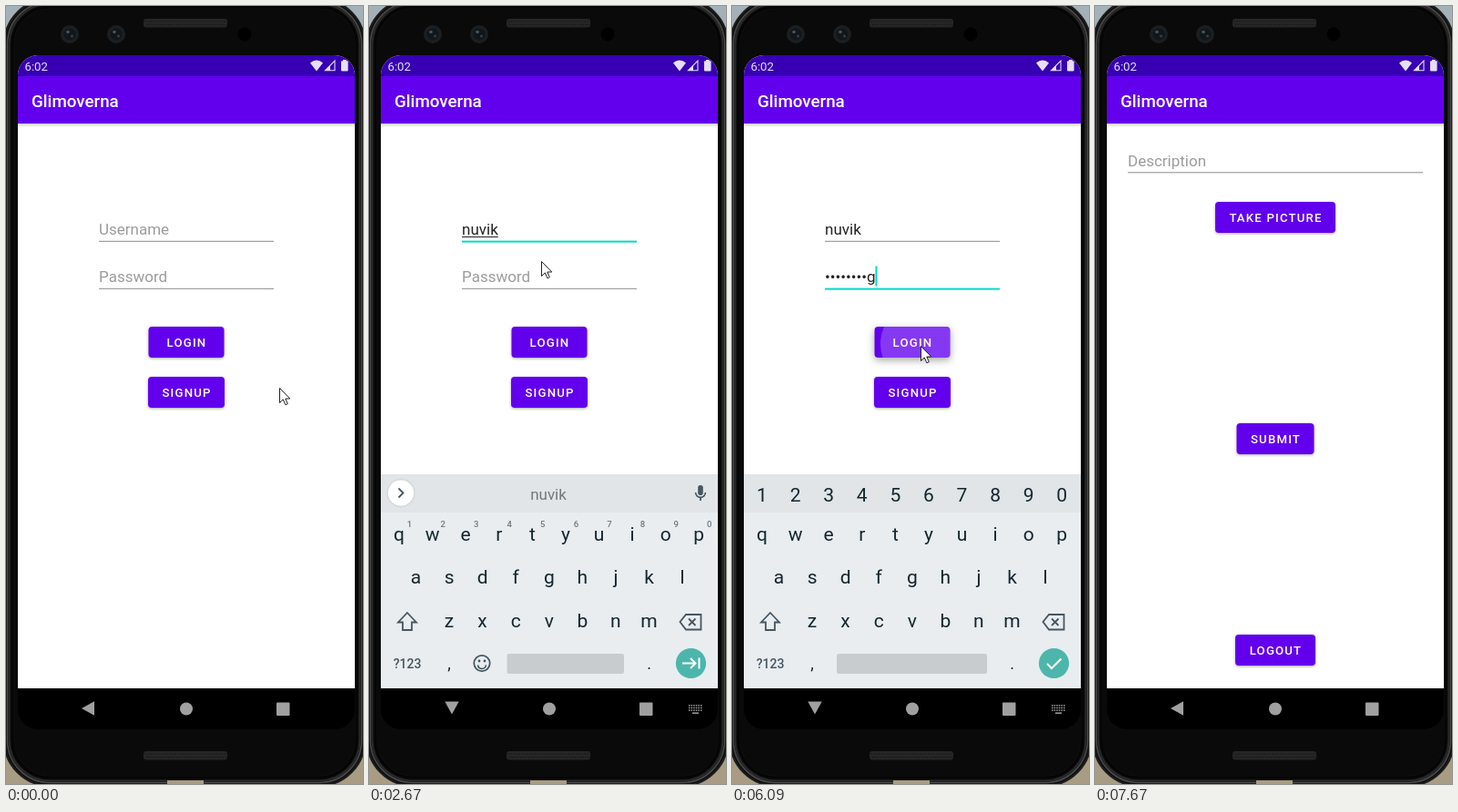
These frames come from a looping animation (392x854 px, 8000 ms). An HTML page with a canvas:

```html
<!DOCTYPE html>
<html lang="en">
<head>
<meta charset="utf-8">
<title>Login demo</title>
<style>
html, body { margin: 0; width: 100%; height: 100%; overflow: hidden; background: #0a0a0a; }
canvas { display: block; width: 392px; height: 854px; }
</style>
</head>
<body>
<canvas id="stage"></canvas>
<script>
const W = 392, H = 854, LOOP = 8000;
const APP = 'Glimoverna', USER = 'nuvik', SECRET = 'kdtmwopag';
const PURPLE = '#6200ee', TEAL = '#03dac5', KEY = '#14262f', ICON = '#465660';
const dpr = window.devicePixelRatio || 1;

const stage = document.getElementById('stage');
const layer = document.createElement('canvas');
for (const c of [stage, layer]) { c.width = W * dpr; c.height = H * dpr; }
const main = stage.getContext('2d'), side = layer.getContext('2d');
main.scale(dpr, dpr);
side.scale(dpr, dpr);
let g = main;

// Held tracks: [start time, value]
const track = {
  pointer: [[0, [300, 419]], [150, [270, 358]], [285, [234, 285]], [420, [219, 254]],
    [2670, [189, 280]], [2800, [181, 293]], [2960, [177, 298]], [3130, [177, 294]],
    [5320, [181, 306]], [5470, [192, 336]], [5620, [204, 363]], [5770, [207, 373]],
    [6490, [300, 310]], [6650, [354, 274]], [6790, null]],
  focus: [[0, ''], [720, 'user'], [3300, 'pass']],
  caret: [[0, 0], [720, 1], [1250, 0], [1690, 1], [2670, 0], [2960, 1], [3750, 0], [4030, 1],
    [5320, 0], [5770, 1]],
  typed: [[0, 0], [1690, 2], [1970, 4], [2090, 5]],
  secret: [[0, 0], [4030, 2], [4170, 3], [4320, 5], [4460, 6], [4610, 8], [4760, 9]],
  keyboard: [[0, null], [990, [80, .15]], [1110, [45, .4]], [1250, [20, .7]], [1390, [7, .9]],
    [1540, [0, 1]], [7370, [14, .4]], [7520, null]],
  ripple: [[0, null], [6090, [45, .22]], [6210, [70, .24]], [6350, [90, .14]], [6490, [90, .06]], [6650, null]],
  open: [[0, null], [7250, [.26, .2]], [7370, [.85, 1]], [7520, [.98, 1]], [7670, [1, 1]]],
  turn: [[0, 0], [990, .3], [1110, .75], [1250, 1], [7250, .72], [7370, .2], [7520, 0]]
};
const at = (name, t) => track[name].filter(k => k[0] <= t).pop()[1];

function rect(x, y, w, h, fill) { g.fillStyle = fill; g.fillRect(x, y, w, h); }

function round(x, y, w, h, r, fill) {
  g.beginPath();
  g.roundRect(x, y, w, h, r);
  if (fill) { g.fillStyle = fill; g.fill(); }
}

function disc(x, y, r, fill) {
  g.beginPath();
  g.arc(x, y, r, 0, 7);
  g.fillStyle = fill;
  g.fill();
}

function poly(points, fill) {
  g.beginPath();
  for (let i = 0; i < points.length; i += 2) g.lineTo(points[i], points[i + 1]);
  g.closePath();
  if (fill) { g.fillStyle = fill; g.fill(); }
}

function line(points, color, width = 1.8) {
  g.beginPath();
  for (let i = 0; i < points.length; i += 2) g.lineTo(points[i], points[i + 1]);
  stroke(color, width);
}

function stroke(color, width) { g.strokeStyle = color; g.lineWidth = width; g.stroke(); }

function text(s, x, y, size, color, { weight = 400, align = 'left', gap = 0 } = {}) {
  g.font = `${weight} ${size}px Roboto, sans-serif`;
  g.textAlign = align;
  g.letterSpacing = gap + 'px';
  g.fillStyle = color;
  g.fillText(s, x, y);
  const w = g.measureText(s).width;
  g.letterSpacing = '0px';
  return w;
}
const centred = (s, x, y, size, color, weight = 400) => text(s, x, y, size, color, { weight, align: 'center' });

// Paints through a second canvas so overlapping shapes fade as one
function group(alpha, draw) {
  if (alpha >= 1) return draw();
  side.clearRect(0, 0, W, H);
  side.save();
  g = side;
  draw();
  g = main;
  side.restore();
  g.save();
  g.setTransform(dpr, 0, 0, dpr, 0, 0);
  g.globalAlpha = alpha;
  g.drawImage(layer, 0, 0, W, H);
  g.restore();
}

function zoom(s) {
  g.translate(198, 424);
  g.scale(s, s);
  g.translate(-198, -424);
}

function phone() {
  const bg = g.createLinearGradient(0, 0, 0, H);
  bg.addColorStop(0, '#a3b1b8');
  bg.addColorStop(1, '#a89c83');
  rect(0, 0, W, H, bg);
  round(-2, -8, 396, 864, 50, '#101010');
  const rings = [[0, '#1d1d1d', 2], [3.5, '#4b4b4b', 1.5], [5.5, '#292929', 2], [9, '#050505', 3]];
  for (const [d, color, w] of rings) {
    round(-2 + d, -8 + d, 396 - 2 * d, 864 - 2 * d, 50 - d);
    stroke(color, w);
  }
  round(9, 3, 374, 842, 40, '#0a0a0a');
  rect(177, 850, 40, 4, '#a89c83');
  for (const y of [14, 818]) {
    round(151, y, 92, 9.5, 3, '#262626');
    for (let x = 153; x < 242; x += 3) {
      disc(x, y + 3, .8, '#171717');
      disc(x + 1.5, y + 6.5, .8, '#171717');
    }
  }
  for (const x of [70, 121]) {
    disc(x, 31, 10, '#1b1f22');
    disc(x, 31, 6.5, '#11161a');
    disc(x - 2, 28.5, 1.8, '#4a545a');
    disc(x + 2.5, 33, 1.6, '#353e44');
  }
  disc(262, 31, 7.5, '#000');
}

function button(label, y, w, lift = 0) {
  const x = 198 - w / 2;
  g.save();
  g.shadowColor = 'rgba(0,0,0,.35)';
  g.shadowBlur = (3 + lift) * dpr;
  g.shadowOffsetY = (1 + lift / 3) * dpr;
  round(x, y, w, 34, 4, PURPLE);
  g.restore();
  return () => text(label, 198.5, y + 22.4, 13.2, '#fff', { weight: 500, align: 'center', gap: 1.18 });
}

function frame() {
  rect(13, 54, 370, 695, '#fff');
  rect(13, 54, 370, 23, '#3700b3');
  rect(13, 77, 370, 52, PURPLE);
  const shade = g.createLinearGradient(0, 129, 0, 133);
  shade.addColorStop(0, 'rgba(0,0,0,.18)');
  shade.addColorStop(1, 'rgba(0,0,0,0)');
  rect(13, 129, 370, 4, shade);
  text(APP, 28, 110.5, 18.8, '#fff', { weight: 500 });
}

function field(value, hint, x, w, y, focused) {
  const used = text(value || hint, x, y, 17, value ? '#222' : '#9c9c9c');
  if (focused) rect(x, y + 6.6, w, 2, TEAL);
  else rect(x, y + 6.8, w, 1, '#8a8a8a');
  return value ? used : 0;
}

function loginPage(t) {
  frame();
  const focus = at('focus', t), caret = at('caret', t);
  const name = USER.slice(0, at('typed', t));
  const n = at('secret', t);
  const shown = n && t < 6210;
  const secret = '•'.repeat(shown ? n - 1 : n) + (shown ? SECRET[n - 1] : '');
  const nameW = field(name, 'Username', 102, 192, 251, focus === 'user');
  const secretW = field(secret, 'Password', 102, 192, 303, focus === 'pass');
  if (name && t < 3600) rect(102, 253, nameW, 1, '#222');
  if (caret && focus === 'user') rect(102 + nameW, 234, 2, 22, TEAL);
  if (caret && focus === 'pass') rect(102 + secretW, 285.5, 2, 22, TEAL);

  const ripple = at('ripple', t);
  const login = button('LOGIN', 352, 83, ripple ? 5 : 0);
  if (ripple) {
    g.save();
    round(156.5, 352, 83, 34, 4);
    g.clip();
    disc(208, 371, ripple[0], `rgba(255,255,255,${ripple[1]})`);
    g.restore();
  }
  login();
  button('SIGNUP', 407, 84)();
}

function composePage() {
  frame();
  field('', 'Description', 36, 324, 175.5, false);
  button('TAKE PICTURE', 215, 132)();
  button('SUBMIT', 458, 85)();
  button('LOGOUT', 690, 88)();
}

function mic(x, y) {
  round(x - 2.8, y - 9, 5.6, 11, 2.8, ICON);
  g.beginPath();
  g.arc(x, y - 1, 5.4, 0, Math.PI);
  stroke(ICON, 1.6);
  line([x, y + 4, x, y + 8], ICON);
}

function chevron(dir) {
  g.save();
  g.shadowColor = 'rgba(0,0,0,.25)';
  g.shadowBlur = 2 * dpr;
  disc(35, 534.5, 14.3, '#fff');
  g.restore();
  line([35 - 2.5 * dir, 529.5, 35 + 2.5 * dir, 534.5, 35 - 2.5 * dir, 539.5], ICON);
}

function toolbar() {
  const grey = '#6d7980';
  chevron(-1);
  g.beginPath();
  g.arc(82, 533, 5, 0, 7);
  stroke(grey, 2);
  line([86, 537, 92, 543], grey, 2.2);
  g.beginPath();
  g.moveTo(131, 528);
  g.lineTo(145, 528);
  g.lineTo(145, 537);
  g.lineTo(140, 542);
  g.lineTo(131, 542);
  g.closePath();
  stroke(grey, 1.7);
  g.beginPath();
  g.arc(138, 535, 3.5, 0, Math.PI);
  stroke(grey, 1.5);
  disc(135.5, 532, 1, grey);
  disc(140.5, 532, 1, grey);
  centred('GIF', 190.5, 539.5, 13.5, grey, 900);
  round(243.5, 531, 11, 12, 1.5);
  stroke(grey, 1.4);
  round(237, 527, 11, 12, 1.5, grey);
  centred('G', 242.5, 536.5, 9.5, '#e1e5e8', 700);
  centred('x', 251, 541, 8, grey, 700);
  rect(278, 524, 1, 22, '#cbd0d3');
  for (const x of [306, 312, 318]) disc(x, 535, 1.9, grey);
  mic(364, 535);
}

function suggestions(n) {
  chevron(1);
  const grey = '#70797e';
  const name = USER.slice(0, n);
  const words = n === 5 ? ['', name, ''] : n === 4 ? ['navy', name, 'novice'] : ['nut', name, 'number'];
  words.forEach((w, i) => centred(w, 197 + (i - 1) * 106, 542, 17, grey));
  mic(364, 535);
}

function keyRow(keys, x, y, size = 21) {
  [...keys].forEach((k, i) => centred(k, x + i * 36.58, y, size, KEY));
}

function keyboard(t, dy) {
  const numeric = t >= 3600;
  const typed = at('typed', t);
  g.translate(0, dy);
  rect(13, 514, 370, 42, '#e1e5e8');
  rect(13, 556, 370, 193, '#e9edf0');
  if (numeric) keyRow('1234567890', 33, 543.5);
  else if (typed) suggestions(typed);
  else toolbar();

  keyRow('qwertyuiop', 33, 587);
  keyRow('asdfghjkl', 51.5, 634);
  keyRow('zxcvbnm', 88, 682);
  if (!numeric) [...'1234567890'].forEach((k, i) => centred(k, 44.5 + i * 36.58, 572, 9.5, '#6d787e', 500));

  poly([42, 666, 52, 676.5, 47, 676.5, 47, 685, 37, 685, 37, 676.5, 32, 676.5]);
  stroke(ICON, 1.8);
  poly([341.5, 676, 348, 668, 364.5, 668, 364.5, 684.5, 348, 684.5]);
  stroke(ICON, 1.8);
  line([351, 672.5, 358.5, 680], ICON);
  line([358.5, 672.5, 351, 680], ICON);

  centred('?123', 42, 727, 14, ICON, 500);
  centred(',', 88, 728, 18, KEY);
  centred('.', 307.5, 728, 18, KEY);
  const left = numeric ? 115 : 151.5;
  round(left, 711, 280 - left, 22, 2.5, '#c8cccf');
  if (!numeric) {
    g.beginPath();
    g.arc(124, 721.5, 8.7, 0, 7);
    stroke(ICON, 1.8);
    g.beginPath();
    g.arc(124, 723, 4.5, .1, Math.PI - .1);
    stroke(ICON, 1.6);
    disc(121, 719, 1.4, ICON);
    disc(127, 719, 1.4, ICON);
  }
  disc(353.5, 721.5, 16.6, '#4db6ac');
  if (numeric && t >= 3750) line([346, 722, 351, 727, 361.5, 716.5], '#fff', 2);
  else {
    line([344, 721.5, 358.5, 721.5], '#fff', 2);
    line([353, 716, 358.5, 721.5, 353, 727], '#fff', 2);
    line([362.5, 715.5, 362.5, 727.5], '#fff', 2);
  }
}

function statusIcons() {
  const c = '#e6e0f6';
  text('6:02', 20.5, 70.5, 13.2, c);
  g.beginPath();
  g.moveTo(341, 71.5);
  g.lineTo(334, 62.5);
  g.quadraticCurveTo(341, 56.5, 348, 62.5);
  g.fillStyle = c;
  g.fill();
  poly([350.5, 70.8, 361, 70.8, 361, 60]);
  stroke(c, 1.1);
  poly([350.5, 71, 356, 71, 356, 65.3], c);
  round(368, 60.3, 7.6, 11.2, 1, c);
  rect(370, 59, 3.6, 2, c);
}

function navIcons(t) {
  const c = '#a0a0a0', turn = at('turn', t);
  g.save();
  g.translate(91, 771 - turn * 1.5);
  g.rotate(-turn * Math.PI / 2);
  poly([-8, 0, 6, -7.7, 6, 7.7], c);
  g.restore();
  disc(198, 771.5, 7, c);
  round(297, 764.5, 14.5, 14.5, 1, c);
  if (turn < .75) return;
  for (let row = 0; row < 3; row++)
    for (let i = 0; i < 6; i++) rect(351 + i * 2.6, 767 + row * 2.7, 1.5, 1.5, c);
  rect(355, 775.4, 7, 1.5, c);
}

function arrow([x, y]) {
  g.save();
  g.translate(x + .5, y + .5);
  poly([0, 0, 0, 16, 3.8, 12.4, 6.4, 18.3, 8.8, 17.2, 6.3, 11.5, 11.3, 11.5], '#fff');
  stroke('#222', 1);
  g.restore();
}

function screen(t) {
  const open = at('open', t), keys = at('keyboard', t);
  const p = open ? open[0] : 0;
  g.save();
  round(13, 54, 370, 740, 22, '#000');
  g.clip();
  if (p < 1) {
    g.save();
    zoom(1 + p * .048);
    loginPage(t);
    g.restore();
  }
  if (open) group(open[1], () => {
    g.save();
    zoom(.85 + p * .15);
    composePage();
    g.restore();
  });
  if (keys) {
    const [dy, alpha] = keys, drop = Math.min(dy, 7);
    const s = 1 + p * .048;
    const bottom = 424 + (749 + drop - 424) * s;
    g.save();
    g.beginPath();
    g.rect(13, 54, 370, bottom - 54);
    g.clip();
    group(alpha, () => {
      g.save();
      zoom(s);
      keyboard(t, dy);
      g.restore();
    });
    if (drop) rect(13, 749, 370, drop, 'rgba(0,0,0,.12)');
    g.restore();
  }
  statusIcons();
  navIcons(t);
  g.restore();
}

function render(now) {
  const t = now % LOOP;
  g = main;
  phone();
  screen(t);
  const pos = at('pointer', t);
  if (pos) arrow(pos);
  requestAnimationFrame(tick);
}

const start = performance.now();
function tick() { render(performance.now() - start); }
tick();
</script>
</body>
</html>
```
